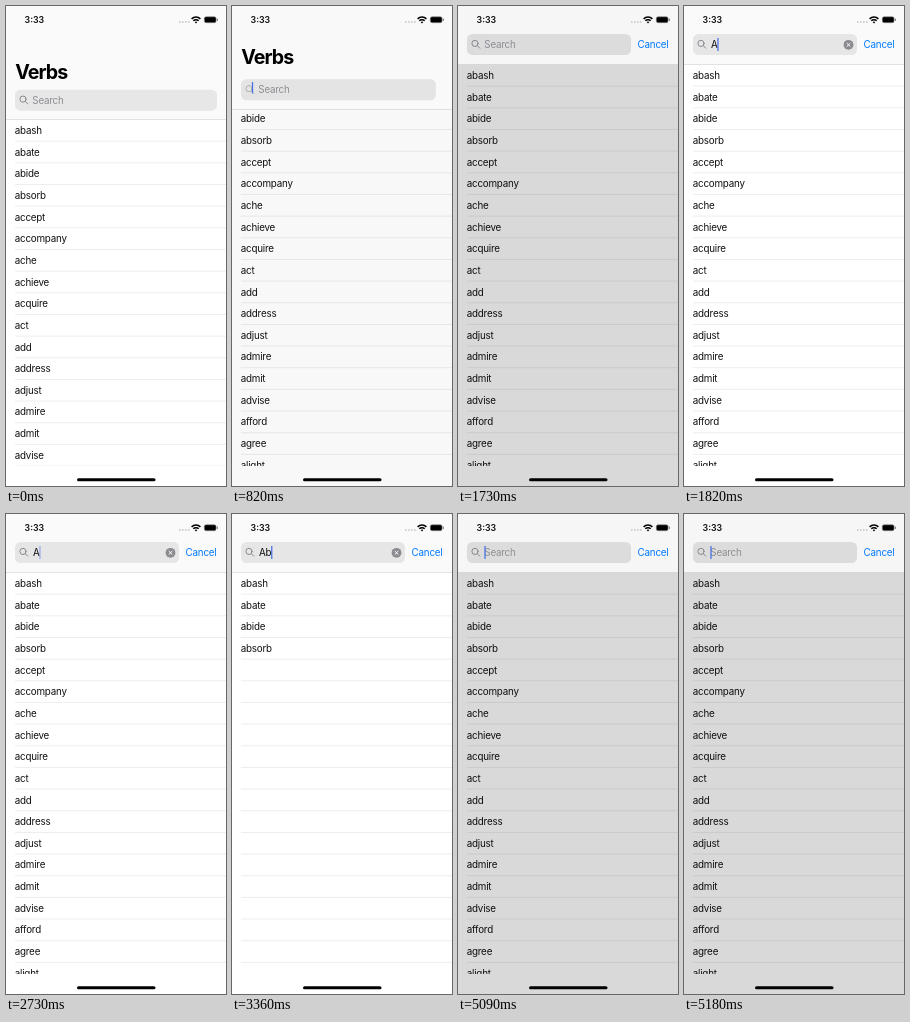
Animation, 220 px wide and 480 px high, one loop 5360 ms. Source, as an HTML page:

```html
<!DOCTYPE html>
<html lang="en">
<head>
<meta charset="utf-8">
<title>Verb search</title>
<style>
  html, body { margin: 0; width: 100%; height: 100%; overflow: hidden; background: #fff; }
  svg { display: block; width: 220px; height: 480px; }
  text { font: 9.8px Inter, sans-serif; letter-spacing: -.2px; fill: #111; white-space: pre; }
  #title { font-size: 19.6px; font-weight: 700; letter-spacing: -.95px; fill: #000; }
  #clock { font-size: 8.8px; font-weight: 600; letter-spacing: 0; }
  #hint { fill: #8e8e93; }
  #cancel { fill: #007aff; }
</style>
</head>
<body>
<svg viewBox="0 0 220 480">
  <clipPath id="page"><rect width="220" height="460"/></clipPath>
  <rect width="220" height="480" fill="#fff"/>
  <g clip-path="url(#page)"><g id="list"></g></g>
  <rect id="dim" width="220" height="480"/>

  <rect id="nav" width="220"/>
  <rect id="edge" width="220" height=".6" fill="#d0d0d3"/>
  <text id="title" x="9.3">Verbs</text>
  <g id="search">
    <rect id="field" x="9" height="21" rx="5.5"/>
    <g id="lens" fill="none" stroke="#8a8a8f" stroke-linecap="round">
      <circle cx="17" cy="9.4" r="3.1"/><path d="M19.3 11.7l2.5 2.5"/>
    </g>
    <text id="hint" x="26.3" y="14">Search</text>
    <text id="query" x="27" y="14"></text>
    <g id="clear">
      <circle cx="164.5" cy="10.8" r="4.9" fill="#8a8a8f"/>
      <path d="M162.7 9l3.6 3.6m0-3.6l-3.6 3.6" stroke="#fff"/>
    </g>
    <rect id="caret" width="1.2" fill="#416ee6"/>
    <text id="cancel" y="14">Cancel</text>
  </g>

  <text id="clock" x="18.6" y="17">3:33</text>
  <path d="M173 16h11" stroke="#c4c4c6" stroke-width="1.4" stroke-dasharray="1.6 1.4"/>
  <g fill="none" stroke="#000" stroke-width="1.5">
    <path d="M185.6 12.9a6.2 6.2 0 0 1 8.8 0M187.3 14.8a3.8 3.8 0 0 1 5.4 0"/>
    <path d="M190 17.4l-1.3-1.4a1.9 1.9 0 0 1 2.6 0z" fill="#000" stroke="none"/>
  </g>
  <rect x="198.3" y="10.8" width="11.8" height="5.9" rx="1.7" stroke="#8a8a8a" stroke-width=".6"/>
  <rect x="210.9" y="12.6" width="1" height="2.3" rx=".5" fill="#777"/>
  <rect x="71" y="472.2" width="78.5" height="3" rx="1.5"/>
</svg>
<script>
const LOOP = 5360, FPS = 11, ROW = 21.66, LIST_TOP = 58.5;
const WORDS = ('abash abate abide absorb accept accompany ache achieve acquire act add address ' +
  'adjust admire admit advise afford agree alight').split(' ');
const $ = id => document.getElementById(id);
const set = (id, attrs) => { for (const k in attrs) $(id).setAttribute(k, attrs[k]); };
const clamp = v => Math.max(0, Math.min(1, v));
const mix = (a, b, p) => a + (b - a) * p;
const gray = v => `rgb(${v},${v},${v + 1})`;

$('list').innerHTML = WORDS.map((word, i) =>
  `<text x="8.7" y="${LIST_TOP + i * ROW + 14.4}">${word}</text>` +
  `<path d="M9 ${LIST_TOP + (i + 1) * ROW}H220" stroke="#e6e6e8" stroke-width=".7"/>`).join('');
const labels = [...$('list').querySelectorAll('text')];

// Typing steps: [tick, query]
const EDITS = [[0, ''], [20, 'A'], [36, 'Ab'], [50, 'A'], [56, '']];
const FADES = [17, 24, 35, 42];
const BLINK = [.6, .2, .02, 0, 0, 0, .5];

function caretAlpha(tick, edited) {
  const start = FADES.filter(f => f <= tick && f >= edited).pop();
  return BLINK[tick - start] ?? 1;
}

function draw(ms) {
  const tick = Math.floor((ms + 5) * FPS / 1000);
  const u = clamp((tick - 7.85) / 4.15);
  const p = u * u * (3 - 2 * u);
  const [edited, query] = EDITS.filter(e => e[0] <= tick).pop();
  const dim = query ? 0 : p;
  const bottom = mix(113.3, 58.3, p);
  const pressed = tick < 8 ? clamp((tick - 3) / 2) : dim;

  set('list', { transform: `translate(0 ${tick < 8 ? 55 : 0})` });
  labels.forEach((label, i) => label.style.display = query === 'Ab' && i > 3 ? 'none' : '');
  set('dim', { opacity: .148 * dim });
  set('nav', { height: bottom, fill: gray(Math.round(mix(250, 246, dim))) });
  set('edge', { y: bottom });
  set('title', { y: 73.2 - 83 * p, opacity: clamp(1.5 - 2.2 * p) });

  set('search', { transform: `translate(0 ${mix(83.7, 28, p)})` });
  const tone = tick < 8 ? mix(231, 228, pressed) : mix(230, 220, dim);
  set('field', { width: mix(202, 164, p), fill: gray(Math.round(tone)) });
  set('lens', { opacity: u > 0 && p < 1 ? mix(.5, 1, p) : 1 });
  set('hint', { opacity: query ? 0 : 1 });
  $('query').textContent = query;
  set('clear', { opacity: query ? 1 : 0 });
  set('cancel', { x: mix(218, 179.6, p), opacity: clamp((p - .25) / .75) });
  set('caret', {
    x: query ? 27 + $('query').getComputedTextLength() - .2 : mix(18.4, 26.4, p),
    y: mix(2.5, 4, p),
    height: mix(11, 13, p),
    opacity: u > 0 ? caretAlpha(tick, edited) : 0
  });
}

const begin = performance.now();
function loop() {
  draw((performance.now() - begin) % LOOP);
  requestAnimationFrame(loop);
}
loop();
</script>
</body>
</html>
```
